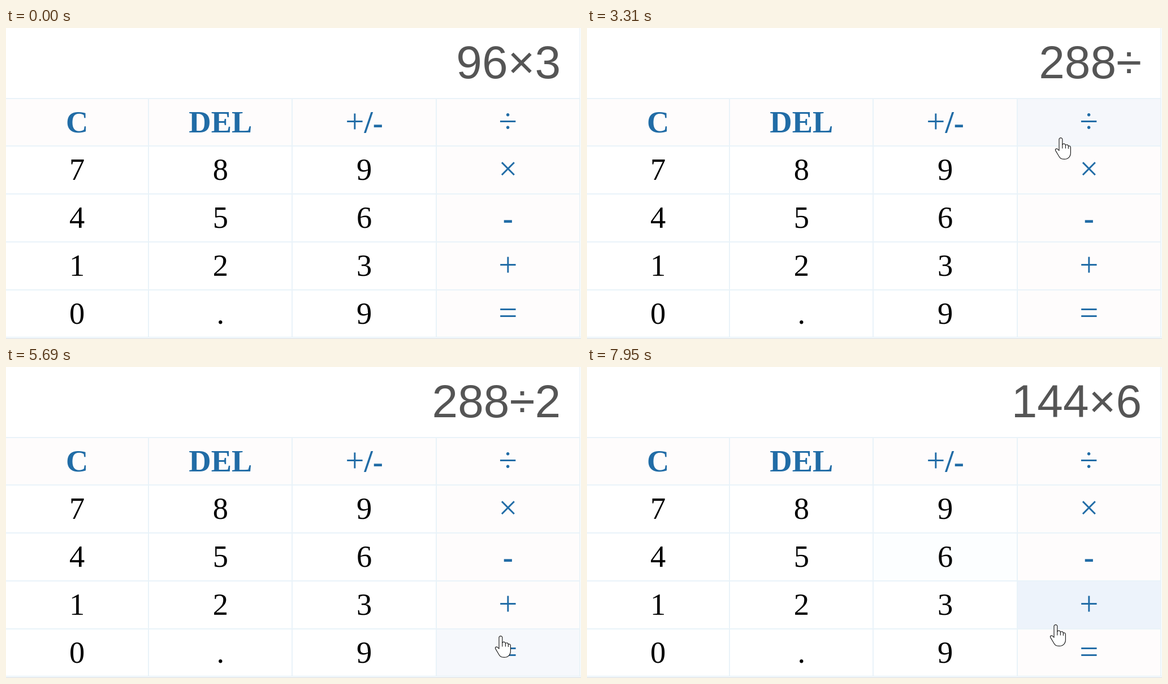
Write an HTML page that moves like this. It is 1017 px wide and 551 px high and loops after 8000 ms.

```html
<!DOCTYPE html>
<html lang="en">
<head>
<meta charset="utf-8">
<title>Calculator</title>
<style>
html, body { margin: 0; width: 100%; height: 100%; overflow: hidden; background: #fff; }
.calc { position: relative; width: 1017px; height: 551px; overflow: hidden; }

.display { position: absolute; top: 0; right: 36px; height: 121px; overflow: hidden; }
.lines {
  font: 82px/121px "Liberation Sans", Arial, sans-serif;
  color: #555; text-align: right; white-space: nowrap;
  animation: lines 8s step-end infinite;
}
@keyframes lines {
  0% { transform: translateY(0); }
  23.125% { transform: translateY(-121px); }
  36.625% { transform: translateY(-242px); }
  60.625% { transform: translateY(-363px); }
  74% { transform: translateY(-484px); }
  87.7% { transform: translateY(-605px); }
  93.5%, 100% { transform: translateY(-726px); }
}

.keys {
  position: absolute; left: 0; top: 123.7px;
  display: grid; grid-template: repeat(5, 84.75px) / 253.3px repeat(3, 254.2px);
  font: 54.5px/81px "Liberation Serif", "Times New Roman", serif;
  text-align: center;
}
.keys div {
  position: relative; z-index: 0; box-sizing: border-box;
  border: solid #e9f3f9; border-width: 2px 2px 0 0;
}
.keys .op { background: #fefcfc; color: #216ca6; font-weight: bold; }
.keys i { font-style: normal; font-weight: normal; font-size: 1.08em; line-height: 0; }
.keys s { text-decoration: none; position: relative; top: 2px; }
.keys div::before {
  content: ""; position: absolute; inset: 0; z-index: -1;
  background: #ebf3fa; opacity: 0; animation: var(--hover) 8s linear infinite;
}
.keys .op::before { background: #edf3fb; }
.edge { position: absolute; left: 0; top: 547px; width: 1017px; height: 2px; background: #e9f3f9; }
.edge + .edge { top: 550px; height: 1px; background: #d3d8dc; }
.side { position: absolute; left: 1014px; top: 0; width: 2px; height: 124px; background: #eef5fa; }

@keyframes nine { 0%, 7% { opacity: 0; } 10%, 13% { opacity: 1; } 16.375% { opacity: .42; } 19%, 100% { opacity: 0; } }
@keyframes plus {
  0%, 15.2% { opacity: 0; } 16.375% { opacity: .33; } 17.4% { opacity: .6; }
  20%, 95.5% { opacity: 0; } 98.5%, 100% { opacity: 1; }
}
@keyframes minus {
  0%, 13.6% { opacity: 0; } 15% { opacity: .35; } 16.3%, 28% { opacity: 0; } 29.2% { opacity: .3; }
  31.5%, 79.8% { opacity: 0; } 81% { opacity: .3; } 83%, 100% { opacity: 0; }
}
@keyframes equals {
  0%, 18.4% { opacity: 0; } 22%, 27% { opacity: 1; } 31%, 69.4% { opacity: 0; }
  73%, 79.2% { opacity: 1; } 81% { opacity: .62; } 83.5%, 100% { opacity: 0; }
}
@keyframes times {
  0%, 29.3% { opacity: 0; } 31.5%, 32.8% { opacity: 1; } 36%, 81.3% { opacity: 0; }
  84.5%, 89.6% { opacity: 1; } 94%, 100% { opacity: 0; }
}
@keyframes divide { 0%, 32.8% { opacity: 0; } 36%, 39.8% { opacity: 1; } 43%, 100% { opacity: 0; } }
@keyframes six {
  0%, 42% { opacity: 0; } 45% { opacity: .6; } 51% { opacity: .08; } 53%, 91% { opacity: 0; }
  94%, 95% { opacity: 1; } 99.375%, 100% { opacity: .14; }
}
@keyframes five { 0%, 45.5% { opacity: 0; } 47%, 48% { opacity: .4; } 50.5%, 100% { opacity: 0; } }
@keyframes two { 0%, 49% { opacity: 0; } 51% { opacity: .55; } 54%, 64% { opacity: 1; } 68%, 100% { opacity: 0; } }
@keyframes three { 0%, 65.5% { opacity: 0; } 67.5% { opacity: .5; } 71%, 100% { opacity: 0; } }

.hand {
  position: absolute; left: 0; top: 0; overflow: visible;
  fill: #fff; stroke: #222; stroke-width: 1.2; stroke-linejoin: round; stroke-linecap: round;
  animation: hand 8s steps(2) infinite;
}
/* the pointer moves in ticks of about 77 ms, two to a segment */
@keyframes hand {
  0% { transform: translate(388px, 570px); animation-timing-function: step-end; }
  3.75% { transform: translate(390px, 535px); }
  5.625% { transform: translate(480px, 410px); }
  7.5% { transform: translate(590px, 290px); }
  9.5% { transform: translate(640px, 228px); }
  11.5% { transform: translate(690px, 222px); }
  13.5% { transform: translate(851px, 296px); }
  14.5% { transform: translate(857px, 335px); }
  16.375% { transform: translate(855px, 437px); }
  18.3% { transform: translate(857px, 472px); }
  20.25%, 27% { transform: translate(857px, 481px); }
  28.9% { transform: translate(870px, 385px); }
  30.8% { transform: translate(882px, 262px); animation-timing-function: step-end; }
  31.75% { transform: translate(885px, 233px); }
  33.5% { transform: translate(886px, 172px); }
  34.625%, 39.4% { transform: translate(886px, 156px); }
  41.4% { transform: translate(790px, 232px); }
  43.3% { transform: translate(640px, 308px); }
  45.2% { transform: translate(490px, 350px); }
  47.1% { transform: translate(365px, 366px); }
  48.875% { transform: translate(322px, 370px); }
  51% { transform: translate(355px, 380px); }
  53.9% { transform: translate(388px, 396px); }
  59.625%, 63.5% { transform: translate(400px, 400px); }
  65.4% { transform: translate(480px, 406px); }
  67.3% { transform: translate(650px, 428px); }
  69.2% { transform: translate(810px, 462px); }
  70.625%, 78.4% { transform: translate(875px, 476px); }
  79.125% { transform: translate(890px, 445px); }
  81% { transform: translate(928px, 297px); }
  82.9% { transform: translate(922px, 262px); }
  85%, 88.7% { transform: translate(905px, 246px); }
  90.6% { transform: translate(760px, 302px); }
  91.9%, 94.5% { transform: translate(662px, 331px); }
  96.5% { transform: translate(785px, 405px); }
  98.4% { transform: translate(820px, 444px); animation-timing-function: step-end; }
  99.375%, 100% { transform: translate(829px, 456px); }
}
</style>
</head>
<body>
<div class="calc">
  <div class="display">
    <div class="lines">96×3<br>288<br>288÷<br>288÷2<br>144<br>144×<br>144×6</div>
  </div>
  <div class="side"></div>
  <div class="keys">
    <div class="op">C</div><div class="op">DEL</div><div class="op"><i>+</i>/<s>-</s></div><div class="op" style="--hover: divide"><i>÷</i></div>
    <div>7</div><div>8</div><div style="--hover: nine">9</div><div class="op" style="--hover: times"><i>×</i></div>
    <div>4</div><div style="--hover: five">5</div><div style="--hover: six">6</div><div class="op" style="--hover: minus"><s>-</s></div>
    <div>1</div><div style="--hover: two">2</div><div style="--hover: three">3</div><div class="op" style="--hover: plus"><i>+</i></div>
    <div>0</div><div>.</div><div>9</div><div class="op" style="--hover: equals"><i>=</i></div>
  </div>
  <div class="edge"></div><div class="edge"></div>
  <svg class="hand" width="1" height="1">
    <path d="M-3 3.4C-3-.2 2.8-.2 2.8 3.4V12.4C4 10.4 8 10.8 8.4 13.6C10 12 13.2 12.8 13.4 15.4C15.4 14.2 17.4 15.4 17.4 18V27C17.4 34 13 38.4 6 38.4C0 38.4-2 36-4 32L-9 23.6C-10.6 20.6-8 18.8-5.6 20.6L-3 23.2Z"/>
    <path fill="none" d="M2.8 12V19M8.4 13.6V19M13.4 15.4V19.5"/>
  </svg>
</div>
</body>
</html>
```
